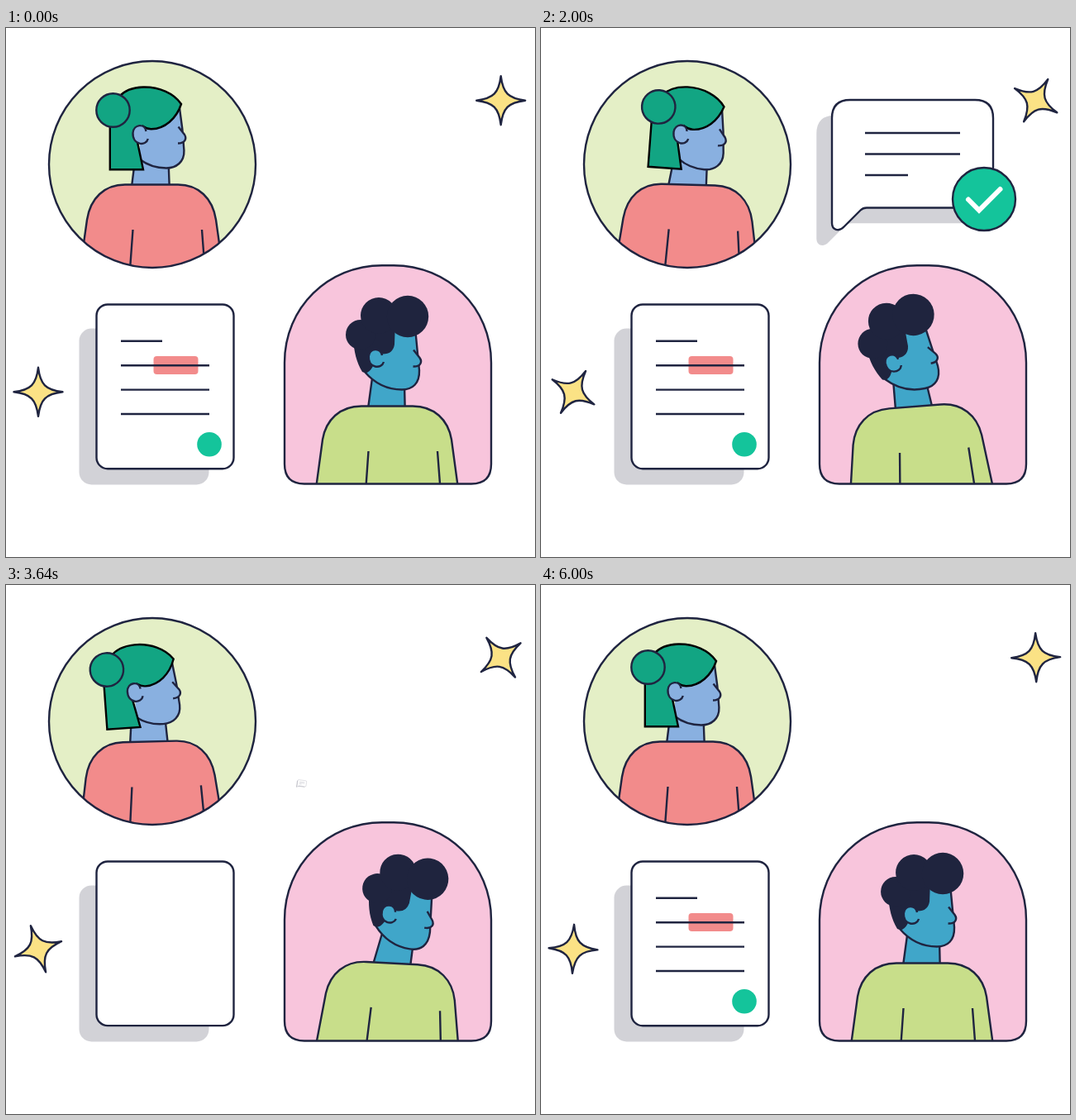
Recreate the animation shown at these times as an HTML page with a canvas. Size 640x640 px, loop 6.07 s.

```html
<!DOCTYPE html>
<html>
<head>
<meta charset="utf-8">
<style>
html, body { margin: 0; width: 100%; height: 100%; overflow: hidden; background: #fff; }
canvas { display: block; }
</style>
</head>
<body>
<canvas id="stage" width="640" height="640"></canvas>
<script>
const c = document.getElementById('stage').getContext('2d');
const LOOP = 6070, INK = '#1f2440', SHADE = '#d2d2d7', GREEN = '#14c49b', WIDTH = 2.4;

// Progress of t through a span, clamped to 0..1.
const prog = (t, start, length) => Math.min(1, Math.max(0, (t - start) / length));
const inOut = x => x < .5 ? 2 * x * x : 1 - 2 * (1 - x) ** 2;
const backOut = x => 1 + 2.7 * (x - 1) ** 3 + 1.7 * (x - 1) ** 2;

// Smooth interpolation through [time, value] pairs.
function track(t, keys) {
  for (let i = 1; i < keys.length; i++) {
    const [a, v] = keys[i - 1], [b, w] = keys[i];
    if (t <= b) {
      const x = prog(t, a, b - a);
      return v + (w - v) * x * x * (3 - 2 * x);
    }
  }
  return keys[keys.length - 1][1];
}

function paint(path, fill, stroke = INK) {
  const p = typeof path === 'string' ? new Path2D(path) : path;
  if (fill) { c.fillStyle = fill; c.fill(p); }
  if (stroke) { c.strokeStyle = stroke; c.stroke(p); }
}

function circle(x, y, r) {
  const p = new Path2D();
  p.arc(x, y, Math.max(0, r), 0, 7);
  return p;
}

function box(x, y, w, h, r) {
  const p = new Path2D();
  p.roundRect(x, y, w, h, r);
  return p;
}

function rule(x, y, length, amount) {
  if (amount > 0) paint(`M${x} ${y}h${length * amount}`);
}

function group(draw) {
  c.save();
  draw();
  c.restore();
}

function turn(x, y, angle) {
  c.translate(x, y);
  c.rotate(angle);
  c.translate(-x, -y);
}

function star(x, y, angle) {
  group(() => {
    c.translate(x, y);
    c.rotate(angle);
    paint('M0-29.5C2.5-9 9-2.5 29.5 0C9 2.5 2.5 9 0 29.5C-2.5 9-9 2.5-29.5 0C-9-2.5-2.5-9 0-29.5Z', '#fbe285');
  });
}

// A framed portrait: the head leans by angle, the body follows with less.
function portrait(frame, back, head, body) {
  paint(frame, back, null);
  group(() => {
    c.clip(frame);
    group(head);
    group(body);
  });
  paint(frame);
}

const roundFrame = circle(177, 165, 125);
const archFrame = new Path2D('M337 405C337 338 390 287.2 455 287.2H469C534 287.2 587 338 587 405V527.5Q587 551.5 563 551.5H361Q337 551.5 337 527.5Z');

function woman(t) {
  const lean = track(t, [[0, 0], [720, .14], [1600, .14], [2690, -.072], [3750, -.072], [4650, .033], [5900, 0]]);
  const lag = track(t, [[0, 0], [570, 2.8], [1400, 5.5], [2500, 2], [3640, 1], [4570, 2.7], [5900, 0]]);
  const skin = '#89b0e0', hair = '#12a583';
  portrait(roundFrame, '#e4efc6', () => {
    turn(173, 220, lean);
    paint('M156 160L151 200H198L196.5 160', skin);
    paint('M162 110L210 97L213.3 122L215.4 148C216 162 206 169.5 194 169.5C180 169.5 170 165 162 159', skin);
    paint('M208.5 119.5L216 129C219 134 216.5 139.5 208 139.5', skin);
    paint('M125.8 100V171.2H166L159 138L166 119Q171 122.5 176 122.3C192 122 206 110 212 92C203 79 185 71 166 71.5C152 72 143 76 137 83Z', hair, '#000');
    paint('M169.5 125C168 115 154.5 116 153.5 127C153 142 169.5 143.5 171.8 134', skin);
    paint(circle(129.5 + lag, 99.5 - lag * .4, 20.2), hair);
  }, () => {
    turn(174, 288, lean * .35);
    paint('M89 296L98 232C102 206 119 189.5 144 189.5H208C233 189.5 250 206 254 232L263 296', '#f28b8b');
    paint('M153.5 244L150 292M237 244L240 284');
  });
}

function man(t) {
  const lean = track(t, [[0, 0], [600, -.22], [2420, -.217], [3450, .15], [4620, .15], [6050, 0]]);
  const lag = track(t, [[0, 0], [570, -3.5], [1400, -1.5], [2420, -1.5], [3450, 1.6], [4620, 1.6], [6050, 0]]);
  const skin = '#40a6c9', hair = '#1f243e';
  portrait(archFrame, '#f8c5dc', () => {
    turn(465, 503, lean);
    paint('M443.5 420L436 475H483L482 430', skin);
    paint('M450 365L495.5 368L498 394L500 414C500.5 430 492 437.5 479 437.5C462 437.5 446 430 434 416', skin);
    paint('M493 389.5L500.5 399C504 404 501.5 410 492.5 409.5', skin);
    paint('M471 355L470 383Q468 394.5 456 394.5L446 402L443.5 410Q438 420 431 416C424 404 421 392 420 375Z', hair, null);
    paint(circle(429, 371, 18), hair, null);
    paint(circle(451, 348, 22), hair, null);
    paint(circle(486 + lag, 349 + lag, 25.2), hair, null);
    paint('M455 396C453 386 440 387 438.8 397C438 412 454.5 413 457 404', skin);
  }, () => {
    turn(462, 570, lean * .36);
    paint('M370 594L383 498C387 474 404 457.5 430 457.5H492C518 457.5 535 474 539 498L552 594', '#c8de8a');
    paint('M438.5 512L435 562M522 512L525.8 562');
  });
}

const bubbleShape = 'M374 87H525Q547 87 547 109V195.5Q547 217.5 525 217.5H394Q389.5 217.5 386.5 220.5L366.5 240.5C360.5 247 352 244.5 352 236V109Q352 87 374 87Z';

function bubble(t) {
  let size, angle;
  if (t < 2420) {
    const x = Math.max(0, t - 230);
    size = t < 230 ? prog(t, 40, 190) ** 1.3
      : 1 + .21 * Math.sin(Math.PI * x / 220) * Math.exp(-x / 200);
    angle = .7 * (1 - size);
  } else {
    size = 1 - prog(t, 2420, 1256) ** 2;
    angle = .15 * (1 - size);
  }
  if (size <= 0) return;
  group(() => {
    c.translate(352, 244);
    c.rotate(angle);
    c.scale(size, size);
    c.translate(-352, -244);
    group(() => {
      c.translate(-18.7, 18.7);
      paint(bubbleShape, SHADE, null);
    });
    paint(bubbleShape, '#fff');
    [115, 115, 52].forEach((length, i) =>
      rule(392, 127 + i * 25.5, length, inOut(prog(t, 542 - i * 137, 400))));
    badge(t);
  });
}

function badge(t) {
  const r = 38 * backOut(prog(t, 930, 380)) * (1 - prog(t, 2400, 310) ** 2);
  if (t < 930 || r < .5) return;
  const disc = circle(536, 207, r), tick = inOut(prog(t, 1180, 300));
  paint(disc, GREEN);
  group(() => {
    c.clip(disc);
    c.lineWidth = 6;
    c.lineCap = 'round';
    c.setLineDash([56 * tick, 99]);
    if (tick > 0) paint('M517 207.5L530 220.5L555.5 195', null, '#fff');
  });
}

function page(t) {
  let drop = 0, alpha = 1;
  const fresh = t > 3250;
  if (!fresh) {
    const out = prog(t, 2370, 680) ** 2;
    drop = 40 * out;
    alpha = 1 - out;
  } else if (t < 3640) {
    const x = prog(t, 3250, 390);
    drop = 40 * (1 - x) ** 1.5;
    alpha = Math.min(1, x * 2);
  } else {
    const x = t - 3640;
    drop = -5 * Math.sin(Math.PI * x / 310) * Math.exp(-x / 600) * (1 - prog(t, 4250, 500));
  }
  if (alpha <= 0) return;
  const grow = (start, length) => fresh ? inOut(prog(t, start, length)) : 1;
  group(() => {
    c.globalAlpha = alpha;
    c.translate(0, drop);
    paint(box(88.5, 363.5, 157, 189, 15), SHADE, null);
    paint(box(109.5, 334.5, 166, 198.7, 13.5), '#fff');
    const s = grow(4180, 450);
    paint(box(205.5 - 27 * s, 408 - 11 * s, 54 * s, 22 * s, 4 * s), '#f28b8b', null);
    [50, 107, 107, 107].forEach((length, i) =>
      rule(139, 378.8 + i * 29.4, length, grow(3680 + i * 130, 400)));
    paint(circle(246, 503.8, 14.8 * grow(4330, 350)), GREEN, null);
  });
}

function frame(now) {
  const t = now % LOOP, lap = t / LOOP;
  c.fillStyle = '#fff';
  c.fillRect(0, 0, 640, 640);
  c.lineWidth = WIDTH;
  c.lineJoin = 'miter';
  woman(t);
  man(t);
  page(t);
  bubble(t);
  c.lineJoin = 'round';
  star(39, 440.3, -Math.PI * lap);
  star(598.7, 87.7, Math.PI / 2 * lap);
}

const begin = performance.now();
(function tick() {
  frame(performance.now() - begin);
  requestAnimationFrame(tick);
})();
</script>
</body>
</html>
```
